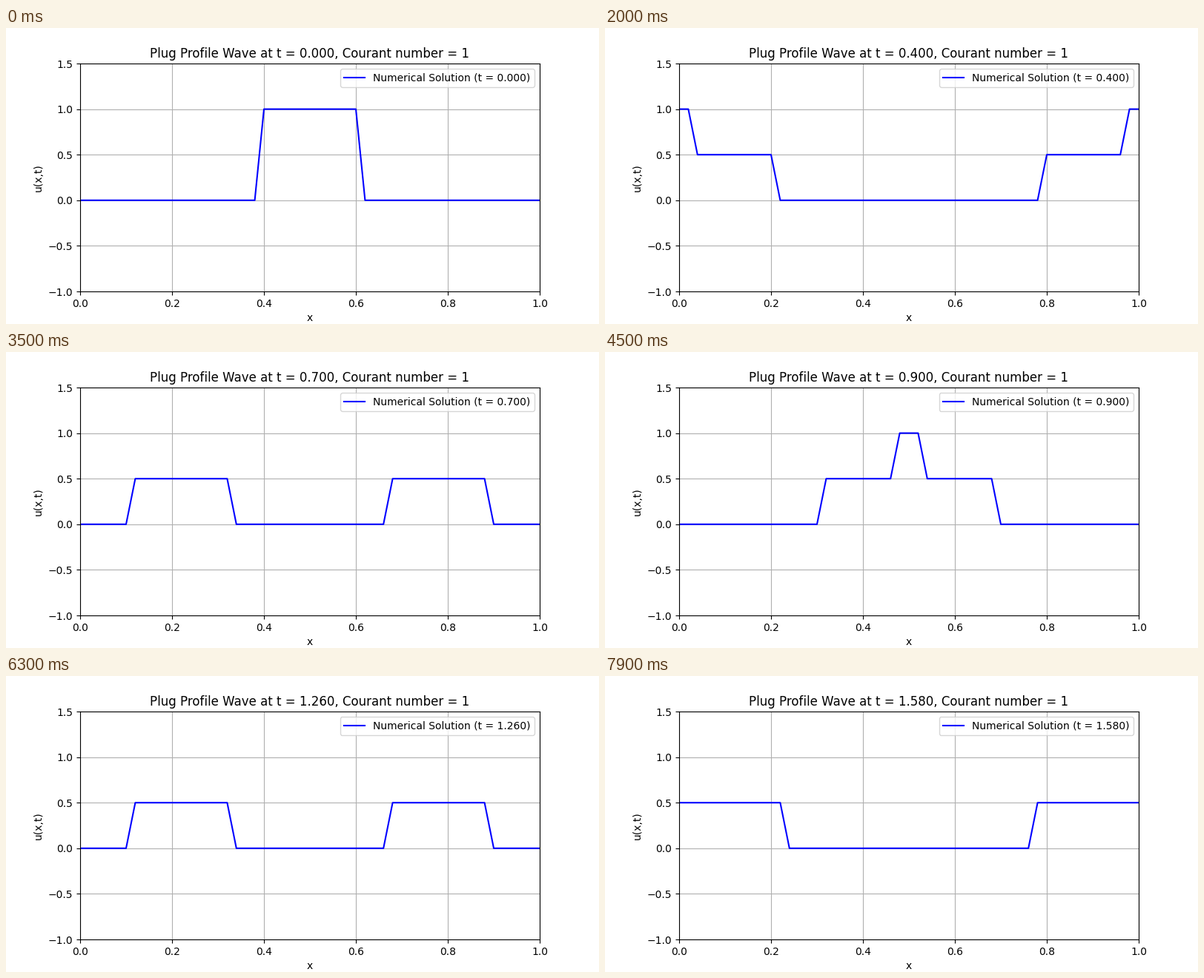
These frames come from a looping animation (800 by 400 pixels, 8 s). A matplotlib script:

```python
import numpy as np
import matplotlib.pyplot as plt
from matplotlib.animation import FuncAnimation

plt.rcParams["font.family"] = "DejaVu Sans"

FRAMES, INTERVAL = 80, 100
CELLS = 50
DT = 1 / CELLS  # Courant number 1: one cell per step
nodes = np.arange(CELLS + 1)


def plug(k):
    """Unit plug, 5 cells either side of the middle, repeated by the reflecting ends."""
    period = CELLS - 1
    offset = (k - CELLS // 2 + period // 2) % period - period // 2
    return (np.abs(offset) <= 5).astype(float)


def wave(n):
    return 0.5 * (plug(nodes + n) + plug(nodes - n))


fig, ax = plt.subplots(figsize=(8, 4), dpi=100)
line, = ax.plot(nodes / CELLS, wave(0), color="blue",
                label="Numerical Solution (t = 0.000)")
ax.set(xlim=(0, 1), ylim=(-1, 1.5), xlabel="x", ylabel="u(x,t)")
ax.grid(True)
title = ax.set_title("")
label = ax.legend(loc="upper right").get_texts()[0]


def update(n):
    t = n * DT
    line.set_ydata(wave(n))
    title.set_text(f"Plug Profile Wave at t = {t:.3f}, Courant number = 1")
    label.set_text(f"Numerical Solution (t = {t:.3f})")
    return line, title, label


update(0)
anim = FuncAnimation(fig, update, frames=FRAMES, interval=INTERVAL,
                     repeat=True, repeat_delay=0, blit=False)
plt.show()
```
